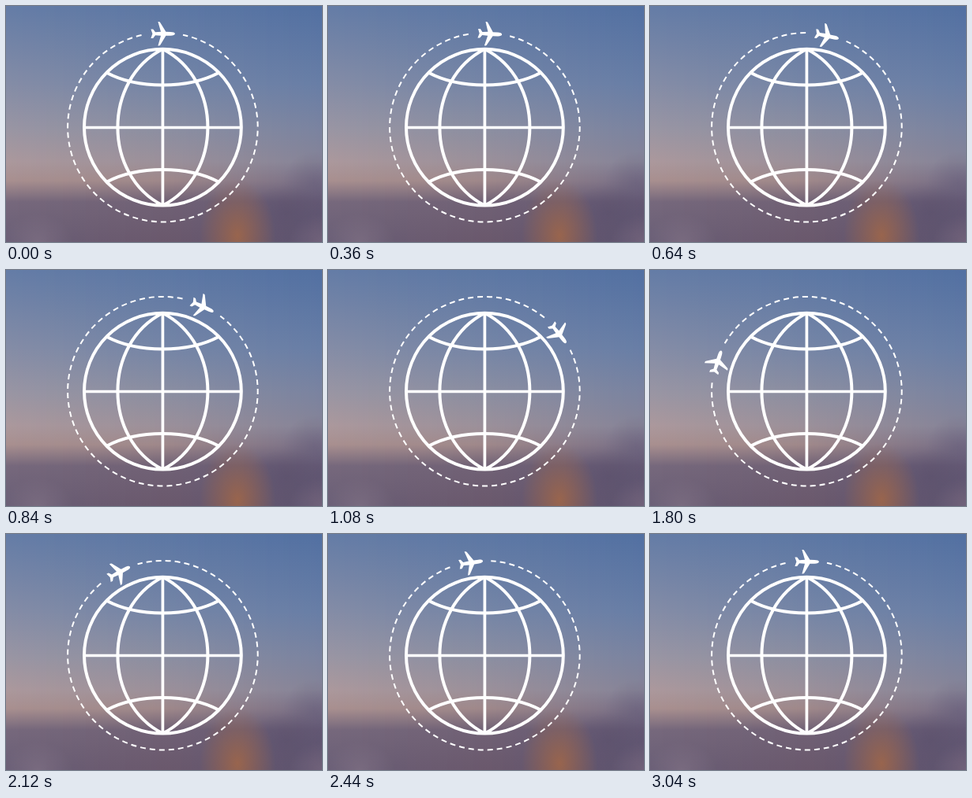
Animation, 400 px wide and 300 px high, one loop 3080 ms. Source, as an HTML page with a canvas:

```html
<!DOCTYPE html>
<html lang="en">
<head>
<meta charset="utf-8">
<title>Around the globe</title>
<style>
html, body { margin: 0; width: 100%; height: 100%; overflow: hidden; background: #6d7390; }
canvas { display: block; width: 400px; height: 300px; }
</style>
</head>
<body>
<canvas id="stage" width="400" height="300"></canvas>
<script>
const W = 400, H = 300, CX = 198.4, CY = 154.2;
const LOOP = 3080, STEP = 40, DELAY = 36, TRAVEL = 2920, EASE = 0.75;
const RING = 120.3, RAD = Math.PI / 180;
const ctx = document.getElementById('stage').getContext('2d');

// Sky colours by height: position, then left, middle and right
const sky = [
  [0, [100, 124, 166], [92, 119, 164], [82, 112, 162]],
  [0.33, [132, 140, 166], [117, 133, 166], [104, 126, 166]],
  [0.52, [153, 149, 163], [139, 142, 161], [122, 131, 160]],
  [0.66, [171, 152, 156], [155, 144, 154], [133, 131, 151]],
  [0.74, [168, 143, 143], [159, 136, 138], [119, 111, 135]],
  [0.83, [118, 104, 124], [112, 97, 117], [99, 88, 115]],
  [1, [105, 94, 118], [106, 88, 108], [92, 83, 111]]
];

function makeSky() {
  const c = document.createElement('canvas');
  c.width = W;
  c.height = H;
  const g = c.getContext('2d');
  for (let x = 0; x < W; x++) {
    const p = 2 * x / W, side = Math.floor(p), k = p - side;
    const grad = g.createLinearGradient(0, 0, 0, H);
    for (const [pos, ...cols] of sky) {
      const next = cols[side + 1];
      const mix = cols[side].map((v, i) => Math.round(v + (next[i] - v) * k));
      grad.addColorStop(pos, `rgb(${mix})`);
    }
    g.fillStyle = grad;
    g.fillRect(x, 0, 1, H);
  }
  glow(g, 40, 300, 44, 36, '136,120,138', 0.5);
  glow(g, 400, 298, 42, 34, '132,112,132', 0.5);
  glow(g, 355, 262, 50, 34, '86,76,106', 0.4);
  glow(g, 390, 225, 40, 40, '98,88,118', 0.4);
  glow(g, 293, 292, 48, 72, '158,102,74', 0.9);
  return c;
}

function glow(g, x, y, rx, ry, rgb, alpha) {
  g.save();
  g.translate(x, y);
  g.scale(rx, ry);
  const grad = g.createRadialGradient(0, 0, 0, 0, 0, 1);
  grad.addColorStop(0, `rgba(${rgb},${alpha})`);
  grad.addColorStop(0.5, `rgba(${rgb},${alpha * 0.5})`);
  grad.addColorStop(1, `rgba(${rgb},0)`);
  g.fillStyle = grad;
  g.fillRect(-1, -1, 2, 2);
  g.restore();
}

const globe = new Path2D();
globe.arc(0, 0, 99.4, 0, Math.PI * 2);
for (const s of [-1, 1]) {
  globe.moveTo(0, -99.4);
  globe.bezierCurveTo(s * 38, -80, s * 57, -40, s * 57, 0);
  globe.bezierCurveTo(s * 57, 40, s * 38, 80, 0, 99.4);
  globe.moveTo(-71, s * 69.5);
  globe.bezierCurveTo(-32, s * 48.5, 32, s * 48.5, 71, s * 69.5);
}

const axes = new Path2D('M-99 .3H99M0 -99V99');

const plane = new Path2D();
for (const s of [-1, 1]) {
  plane.moveTo(15.5, 0);
  plane.bezierCurveTo(15.5, s * 1.6, 13, s * 2.4, 10, s * 2.4);
  plane.lineTo(4, s * 2.5);
  plane.lineTo(-3.2, s * 14.4);
  plane.quadraticCurveTo(-3.8, s * 15.2, -4.8, s * 15.2);
  plane.lineTo(-6, s * 15.2);
  plane.lineTo(-2.4, s * 2.5);
  plane.lineTo(-9.4, s * 2);
  plane.lineTo(-12.2, s * 5.8);
  plane.lineTo(-15, s * 5.8);
  plane.lineTo(-13, 0);
  plane.closePath();
}

// Symmetric cubic ease, solved by bisection
function ease(x) {
  if (x <= 0) return 0;
  if (x >= 1) return 1;
  let lo = 0, hi = 1, u = 0.5;
  for (let i = 0; i < 30; i++) {
    u = (lo + hi) / 2;
    const v = 1 - u;
    const at = 3 * v * v * u * EASE + 3 * v * u * u * (1 - EASE) + u ** 3;
    if (at < x) lo = u; else hi = u;
  }
  return u * u * (3 - 2 * u);
}

const backdrop = makeSky();

function draw(ms) {
  const t = Math.floor((ms % LOOP) / STEP) * STEP;
  ctx.drawImage(backdrop, 0, 0);
  ctx.save();
  ctx.translate(CX, CY);
  ctx.strokeStyle = ctx.fillStyle = '#fff';
  ctx.lineWidth = 4;
  ctx.stroke(globe);
  ctx.lineWidth = 3.7;
  ctx.stroke(axes);

  ctx.rotate(ease((t - DELAY) / TRAVEL) * Math.PI * 2);
  ctx.lineWidth = 2;
  ctx.setLineDash([7, 5]);
  ctx.beginPath();
  ctx.arc(0, 0, RING, -102.9 * RAD, -77.7 * RAD, true);
  ctx.stroke();
  ctx.setLineDash([]);
  ctx.translate(0, -118.9);
  ctx.fill(plane);
  ctx.restore();
}

const start = performance.now();
function tick() {
  draw(performance.now() - start);
  requestAnimationFrame(tick);
}
tick();
</script>
</body>
</html>
```
